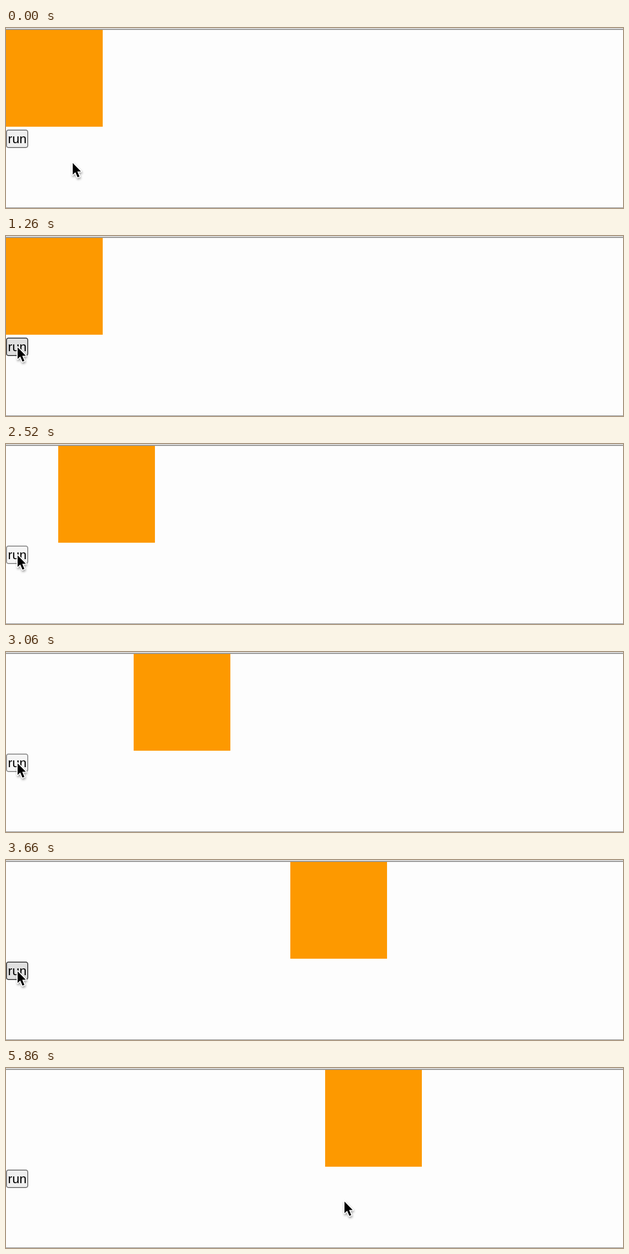
An HTML page that plays this animation: 1276x372 px, repeating every 5960 ms.

```html
<!DOCTYPE html>
<html lang="en">
<head>
<meta charset="utf-8">
<style>
  html, body { margin: 0; width: 100%; height: 100%; overflow: hidden; background: #fdfdfd; }
  svg { display: block; }
  text { font: 26.67px "Liberation Sans", Arial, sans-serif; }
  #cursor { filter: drop-shadow(1px 3px 2px rgba(0, 0, 0, .35)); }
</style>
</head>
<body>
<svg width="1276" height="372" viewBox="0 0 1276 372">
  <rect width="1276" height="2" fill="#e0e0e0"/>
  <rect y="2" width="1276" height="2" fill="#929292"/>
  <rect y="371" width="1276" height="1" fill="#767676"/>
  <rect id="box" y="4" width="200" height="200" fill="#fd9900"/>
  <rect id="button" x="1" y="211" width="44" height="36" rx="4" stroke-width="2"/>
  <text x="4" y="238">run</text>
  <path id="cursor" d="M0 0V24L5.5 19L10 29.5L14 28L9.5 17.5H17Z"
        stroke="#fff" stroke-width="4" stroke-linejoin="round" paint-order="stroke"/>
</svg>
<script>
const LOOP = 5960;
const STEP = 12;
const STEP_MS = 108;
const PRESS_MS = 90;
const LIMIT = 660;

// Every click starts one more timer that pushes the box until it reaches the limit.
const clicks = [1520, 2440, 2640, 3020, 3110, 3800, 4180];

const home = { x: 138, y: 279 };
const glides = [
  { start: 20, end: 580, x: 70, y: 240 },
  { start: 680, end: 1260, x: 24, y: 230 },
  { start: 5080, end: 5800, x: 700, y: 276 }
];

const looks = {
  idle: ["#efefef", "#767676"],
  hover: ["#e0e0e0", "#434343"],
  pressed: ["#f5f5f5", "#8d8d8d"]
};

const [box, button, cursor] = ["box", "button", "cursor"].map(id => document.getElementById(id));
const clamp = u => Math.min(1, Math.max(0, u));
const smooth = u => u * u * (3 - 2 * u);

function boxX(time) {
  const steps = clicks.reduce((sum, click) => sum + Math.max(0, Math.floor((time - click) / STEP_MS)), 0);
  return Math.min(LIMIT, STEP * steps);
}

function cursorAt(time) {
  return glides.reduce((from, to) => {
    const u = smooth(clamp((time - to.start) / (to.end - to.start)));
    return { x: from.x + (to.x - from.x) * u, y: from.y + (to.y - from.y) * u };
  }, home);
}

function buttonLook(time, { x, y }) {
  if (clicks.some(click => time >= click && time < click + PRESS_MS)) return looks.pressed;
  return x < 46 && y >= 210 && y < 248 ? looks.hover : looks.idle;
}

function render(time) {
  box.setAttribute("x", boxX(time));

  const tip = cursorAt(time);
  cursor.setAttribute("transform", `translate(${Math.round(tip.x)} ${Math.round(tip.y)})`);

  const [fill, stroke] = buttonLook(time, tip);
  button.setAttribute("fill", fill);
  button.setAttribute("stroke", stroke);
}

const start = performance.now();
function tick() {
  render((performance.now() - start) % LOOP);
  requestAnimationFrame(tick);
}
tick();
</script>
</body>
</html>
```
